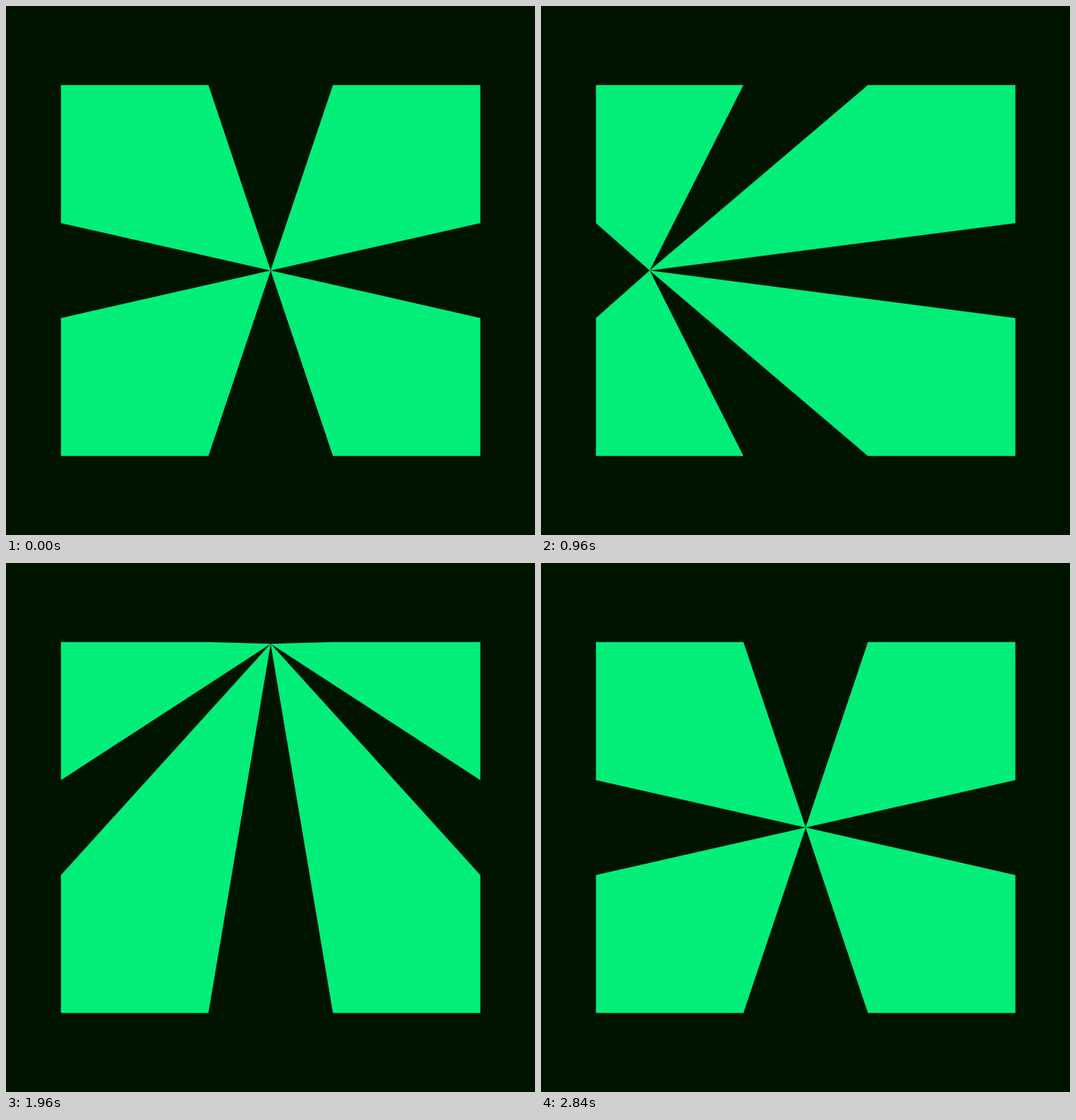
An HTML page that plays this animation: 748 px wide and 748 px high, repeating every 3040 ms.

```html
<!DOCTYPE html>
<html lang="en">
<head>
<meta charset="utf-8">
<title>Moving vanishing point</title>
<style>
  html, body { margin: 0; width: 100%; height: 100%; overflow: hidden; background: #001400; }
  svg { display: block; width: 100vw; height: 100vh; }
</style>
</head>
<body>
<svg viewBox="0 0 748 748"><path id="blades" fill="#02ee78"/></svg>
<script>
const LOOP = 3040, STEP = 40;
const LEFT = 77.7, RIGHT = 670.7, TOP = 111.8, BOTTOM = 636.3;
const center = [374.2, 374];
const right = [RIGHT, 374], left = [LEFT, 374];
const top_ = [374.2, TOP], bottom = [374.2, BOTTOM];

const moves = [
  { start: 0, length: 560, to: right },
  { start: 767, length: 292, to: left },
  { start: 1320, length: 400, to: top_ },
  { start: 1927, length: 292, to: bottom },
  { start: 2480, length: 360, to: center },
];

// Cubic Bezier easing (1, 0, 0.19, 1), solved by bisection
function ease(x) {
  let low = 0, high = 1;
  for (let i = 0; i < 30; i++) {
    const s = (low + high) / 2, r = 1 - s;
    if (3 * r * r * s + 0.57 * r * s * s + s ** 3 < x) low = s;
    else high = s;
  }
  return low * low * (3 - 2 * low);
}

function tipAt(time) {
  let tip = center;
  for (const { start, length, to } of moves) {
    if (time <= start) break;
    const k = ease(Math.min(1, (time - start) / length));
    tip = tip.map((v, i) => v + (to[i] - v) * k);
  }
  return tip;
}

const blade = (x, innerX, y, innerY, tip) =>
  `M${x} ${y}L${innerX} ${y}L${tip}L${x} ${innerY}Z`;

function draw(now) {
  const time = Math.floor((now % LOOP) / STEP) * STEP;
  const tip = tipAt(time);
  const path = [[TOP, 307], [BOTTOM, 441.2]].map(([y, innerY]) =>
    blade(LEFT, 286.2, y, innerY, tip) + blade(RIGHT, 462.3, y, innerY, tip));
  document.getElementById("blades").setAttribute("d", path.join(""));
  requestAnimationFrame(draw);
}
draw(0);
</script>
</body>
</html>
```
